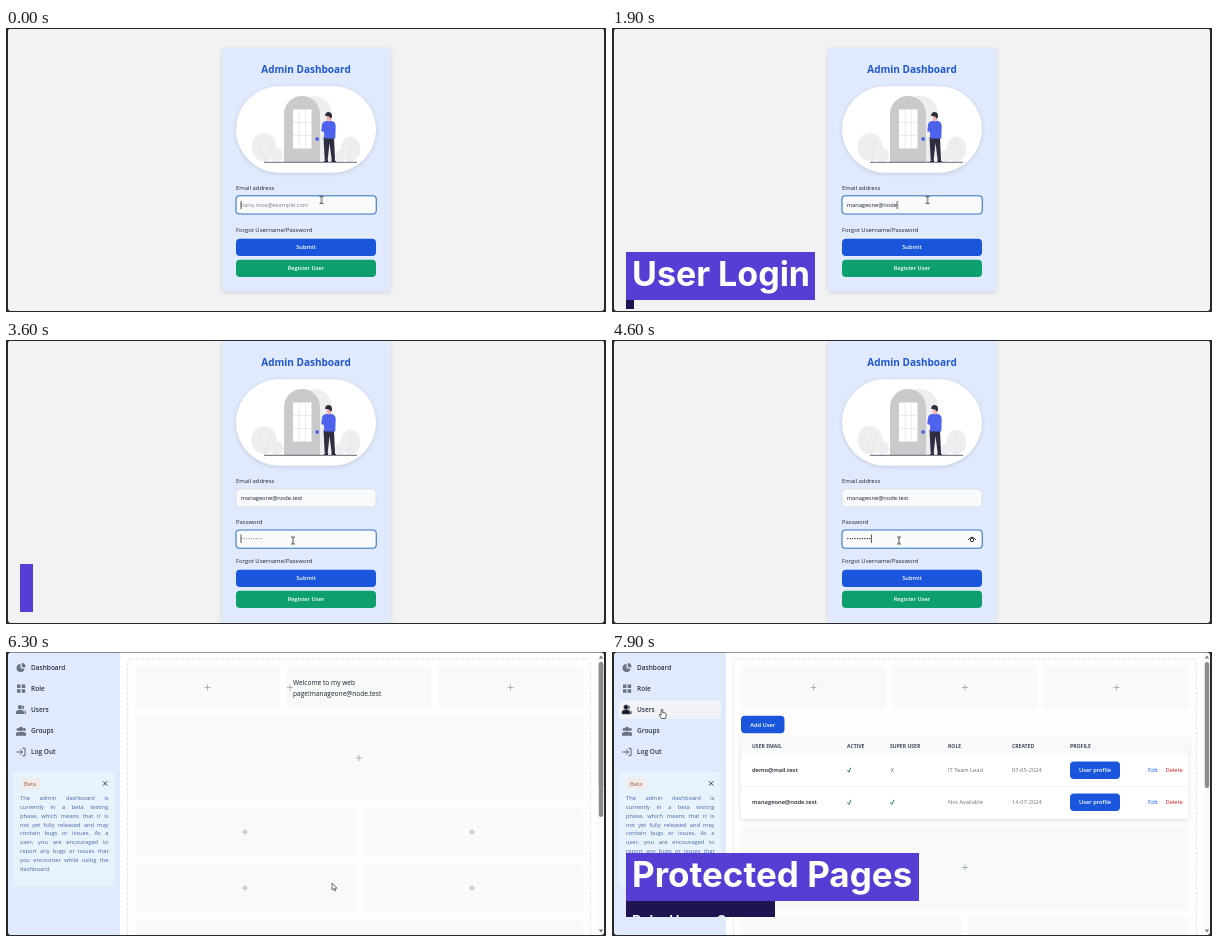
An HTML page for the animation above (8000 ms loop, 600 by 284 pixels).

```html
<!DOCTYPE html>
<html lang="en">
<head>
<meta charset="utf-8">
<title>Admin Dashboard</title>
<style>
html, body { margin: 0; width: 100%; height: 100%; overflow: hidden; background: #282929; }
#stage { position: relative; width: 600px; height: 284px; overflow: hidden; }
#stage > svg { position: absolute; left: 0; top: 0; }
text { font: 5.7px "Open Sans", "Noto Sans", sans-serif; fill: #1b2330; white-space: pre; }
.title { font-size: 10px; font-weight: 700; fill: #1f58d0; }
.label { font-size: 5.9px; font-weight: 500; }
.btn { font-size: 5.7px; font-weight: 600; fill: #fff; }
.mid { text-anchor: middle; }
.nav { font-size: 6.5px; font-weight: 600; fill: #2b3442; }
.head { font-size: 5.1px; font-weight: 700; fill: #414a58; }
.name { font-weight: 600; font-size: 5.8px; }
.soft { fill: #6b7280; }
.edit { fill: #1c64f2; font-weight: 500; }
.del { fill: #c81e1e; font-weight: 500; }
.welcome { font-size: 6.6px; }
.field { fill: #f9fafb; stroke: #d1d5db; stroke-width: .7; }
.focus { fill: none; stroke: #3f7fcf; stroke-width: 1.1; }
.blue { fill: #1a56db; }
.cell rect { fill: #f8f9f9; }
.shadow { filter: drop-shadow(0 1.5px 2px #0002); }
#beta { margin: 0; font: 5.75px/8.85px "Open Sans", "Noto Sans", sans-serif; color: #4a64a8; }
#beta span { display: block; text-align: justify; text-align-last: justify; }
#beta span:last-child { text-align-last: left; }

/* Scenes */
.login, .step1, .step2, .up, .down, .pass, .submit, .panel, .home, .role, .users, .tables,
.hoverR, .hoverU, .beam, .arrow, .hand { animation: 8s step-end infinite; }
.login { animation-name: login; }
.step1 { animation-name: step1; }
.step2 { animation-name: step2; }
.up { animation-name: up; }
.down { animation-name: down; }
.pass { animation-name: pass; }
.submit { animation-name: submit; }
.panel { animation-name: panel; }
.home { animation-name: home; }
.tables { animation-name: tables; }
.role { animation-name: role; }
.users { animation-name: users; }
.hoverR { animation-name: hoverR; }
.hoverU { animation-name: hoverU; }
.beam { animation-name: beam; }
.arrow { animation-name: arrow; }
.hand { animation-name: hand; }
@keyframes login { 0% { opacity: 1 } 72.5%, 100% { opacity: 0 } }
@keyframes step1 { 0% { opacity: 1 } 36.25%, 100% { opacity: 0 } }
@keyframes step2 { 0% { opacity: 0 } 36.25%, 100% { opacity: 1 } }
@keyframes up { 0% { transform: none } 36.25%, 100% { transform: translateY(-19px) } }
@keyframes down { 0% { transform: none } 36.25%, 100% { transform: translateY(19px) } }
@keyframes pass { 0% { opacity: 0 } 43.7% { opacity: 1 } 68.5%, 100% { opacity: 0 } }
@keyframes submit { 0% { opacity: 0 } 36.25% { opacity: 1 } 43.7% { opacity: 0 } 68.5%, 100% { opacity: 1 } }
@keyframes panel { 0% { opacity: 0 } 72.5%, 100% { opacity: 1 } }
@keyframes home { 0% { opacity: 0 } 72.5% { opacity: 1 } 87.5%, 100% { opacity: 0 } }
@keyframes tables { 0% { opacity: 0 } 87.5%, 100% { opacity: 1 } }
@keyframes role { 0% { opacity: 0 } 87.5% { opacity: 1 } 96.25%, 100% { opacity: 0 } }
@keyframes users { 0% { opacity: 0 } 96.25%, 100% { opacity: 1 } }
@keyframes hoverR { 0% { opacity: 0 } 86.3% { opacity: 1 } 94.5%, 100% { opacity: 0 } }
@keyframes hoverU { 0% { opacity: 0 } 94.5%, 100% { opacity: 1 } }
@keyframes beam { 0% { opacity: 1 } 34% { opacity: 0 } 43.2% { opacity: 1 } 66%, 100% { opacity: 0 } }
@keyframes arrow { 0% { opacity: 0 } 34% { opacity: 1 } 43.2% { opacity: 0 } 72.5% { opacity: 1 } 86.3%, 100% { opacity: 0 } }
@keyframes hand { 0% { opacity: 0 } 66% { opacity: 1 } 72.5% { opacity: 0 } 86.3%, 100% { opacity: 1 } }

.pointer { animation: point 8s ease-in-out infinite; }
@keyframes point {
  0%, 33.5% { transform: translate(315.5px, 172px) }
  38.7% { transform: translate(307.5px, 181px) }
  44%, 63.5% { transform: translate(287px, 200.5px) }
  68.5%, 72.5% { transform: translate(301px, 239px) }
  77%, 81.5% { transform: translate(326px, 231px) }
  87%, 92.5% { transform: translate(53px, 34.5px) }
  96.5%, 100% { transform: translate(50px, 57px) }
}

/* Captions */
.bar, .sub { position: absolute; left: 14px; overflow: hidden; color: #fff; white-space: pre;
  font-family: Inter, "Open Sans", sans-serif; }
.bar { height: 48px; background: #563dd3; font-size: 34px; font-weight: 700; line-height: 43px; }
.bar span, .sub span { display: block; margin-left: 6px; }
.sub { background: #1e1450; font-size: 14px; font-weight: 600; line-height: 28px; }
.bar, .bar span, .sub { animation: 8s cubic-bezier(.65, 0, .35, 1) infinite; }
.one { --w: 189px; top: 224px; }
.two { --w: 293px; top: 201px; font-size: 35px; }
.one.bar { animation-name: wide1; }
.one span { animation-name: slide1; }
.two.bar { animation-name: wide2; }
.two span { animation-name: slide2; }
@keyframes wide1 { 0% { width: 0 } 15%, 33.75% { width: var(--w) } 48.75%, 100% { width: 0 } }
@keyframes slide1 {
  0% { transform: translateX(calc(var(--w) / 2)) }
  15%, 33.75% { transform: none }
  48.75%, 100% { transform: translateX(calc(var(--w) / 2)) }
}
@keyframes wide2 { 0%, 81% { width: 0 } 96%, 100% { width: var(--w) } }
@keyframes slide2 { 0%, 81% { transform: translateX(calc(var(--w) / 2)) } 96%, 100% { transform: none } }
.dot { top: 272px; width: 8px; animation-name: dot; }
@keyframes dot { 0%, 12.5% { height: 0 } 22.5%, 25% { height: 9px } 33.5%, 100% { height: 0 } }
.list, .list span { animation: list 8s cubic-bezier(.65, 0, .65, .55) infinite; }
.list { top: 249px; width: 149px; }
.list span { animation-name: rise; }
@keyframes list { 0%, 93.5% { height: 0 } 100% { height: 23px } }
@keyframes rise { 0%, 93.5% { transform: translateY(14px) } 100% { transform: translateY(2.5px) } }
</style>
</head>
<body>
<div id="stage">
<svg width="600" height="284" viewBox="0 0 600 284">
  <defs>
    <path id="plus" d="M-3 0H3M0-3V3" stroke="#9ca3af" stroke-width=".8"/>
    <path id="person" d="M-4.5 4.5V3Q-4.5 .5-2 .5H1Q3.5 .5 3.5 3V4.5ZM-.5-4.5A2.2 2.2 0 1 1-.51-4.5Z"/>
    <clipPath id="frame"><rect x="2" y=".5" width="596" height="282.5" rx="3"/></clipPath>
  </defs>
  <g clip-path="url(#frame)">
  <g class="login">
    <rect width="600" height="284" fill="#f0f2f4"/>
    <rect class="step1 shadow" x="216" y="20" width="168.5" height="243.5" rx="3" fill="#e1eafd"/>
    <rect class="step2 shadow" x="216" y="1" width="168.5" height="282" rx="3" fill="#e1eafd"/>
    <g class="up">
      <text class="title mid" x="300" y="45.2">Admin Dashboard</text>
      <rect class="shadow" x="230" y="58.3" width="140" height="86.4" rx="43.2" fill="#fff"/>
      <g fill="#eeeeef">
        <ellipse cx="258" cy="119" rx="12.5" ry="14"/>
        <ellipse cx="270.5" cy="127" rx="6.5" ry="7"/>
        <ellipse cx="344.5" cy="121" rx="10" ry="12.5"/>
        <ellipse cx="334" cy="128" rx="5" ry="6"/>
        <path d="M290 134V86a18 18 0 0 1 36 0V134Z"/>
      </g>
      <path d="M252 112L260 134M264 113L260 134M344 112L341 134M350 118L342 130" stroke="#e0e0e2" stroke-width=".5" fill="none"/>
      <path d="M278 134V86a18 18 0 0 1 36 0V134Z" fill="#cacaca"/>
      <path d="M287 81.500H305.500V120.500H287Z" fill="#fff"/>
      <path d="M293.2 81.5V120.5M299.4 81.5V120.5M287 94.5H305.5M287 107.5H305.5" stroke="#e2e2e2" stroke-width=".7"/>
      <path d="M258 134.3H351" stroke="#3f3d56" stroke-width=".8"/>
      <path d="M317.500 109H328L329 132H325.700L323.500 115L321.700 132H318.700Z" fill="#2f2e41"/>
      <path d="M317.500 134Q318.500 131.500 322 132V134ZM325.500 134V132H328.500L330.500 134Z" fill="#24233a"/>
      <path d="M316 97Q316.500 93.500 320 93H325.500Q329.500 93.500 329.700 98L329.300 110.500H318.300L318 104L315.300 103Z" fill="#4d63ee"/>
      <rect x="309.6" y="109.2" width="3.2" height="3.6" rx="1" fill="#4761ea"/>
      <path d="M320.500 87.500H325V92.500Q323 94.500 321 92.500Z" fill="#f0b0b0"/>
      <path d="M319.2 88Q319 84 322.700 84Q326.500 84.500 326 89L324.800 91Q324 87.500 319.2 88Z" fill="#2f2e41"/>
      <text class="label" x="230" y="162">Email address</text>
      <rect class="field" x="230" y="168" width="140" height="18" rx="3.5"/>
      <rect class="focus step1" x="230" y="167.8" width="140.3" height="18.2" rx="3.5"/>
      <text id="mail" x="234.7" y="179"></text>
      <path id="mailCaret" class="step1" d="M0 173V181" stroke="#111" stroke-width=".7"/>
    </g>
    <g class="step2">
      <text class="label" x="230" y="184">Password</text>
      <rect class="field" x="230" y="190" width="140" height="18" rx="3.5"/>
      <text id="word" x="234.7" y="201" letter-spacing=".3"></text>
      <g class="pass">
        <rect class="focus" x="230" y="190" width="140.3" height="18.2" rx="3.5"/>
        <path id="wordCaret" d="M0 194.5V203" stroke="#111" stroke-width=".7"/>
        <g id="eye" fill="none" stroke="#222" stroke-width=".9">
          <path d="M356 200Q360 194.5 364 200"/><circle cx="360" cy="200" r="1.7"/>
        </g>
      </g>
    </g>
    <g class="down">
      <text class="label" x="230" y="204.2">Forgot Username/Password</text>
      <rect class="blue" x="230" y="210.7" width="140" height="17.4" rx="4"/>
      <rect class="submit" x="229.6" y="210.3" width="140.8" height="18.2" rx="4.5" fill="none" stroke="#0b1533" stroke-width="1.2"/>
      <text class="btn mid" x="300" y="221.4">Submit</text>
      <rect x="230" y="231.7" width="140" height="17.4" rx="4" fill="#0e9f6e"/>
      <text class="btn mid" x="300" y="242.4">Register User</text>
    </g>
  </g>

  <g class="panel">
    <rect width="600" height="284" fill="#fefefe"/>
    <rect width="114" height="284" fill="#e1eafd"/>
    <rect class="hoverR" x="7" y="28" width="102" height="17.5" rx="3" fill="#f1f3f6"/>
    <rect class="hoverU" x="7" y="49" width="102" height="17.5" rx="3" fill="#f1f3f6"/>
    <g fill="#6b7380">
      <path d="M14.5 12A4 4 0 1 0 18.5 16.5H14.5ZM15.8 11V15.2H19.5A4 4 0 0 0 15.8 11Z"/>
      <path id="grid" d="M11 32.5h3.5v3.5h-3.5zM15.7 32.5h3.5v3.5h-3.5zM11 37.2h3.5v3.5h-3.5zM15.7 37.2h3.5v3.5h-3.5z"/>
      <g id="pair">
        <use href="#person" x="14.5" y="57.5"/>
        <path d="M16.5 53.2a2.2 2.2 0 0 1 0 4.3zM18.6 58.2Q20 58.5 20 62H18.6Z"/>
      </g>
      <use href="#person" x="15.5" y="79.3"/>
      <path d="M12 76a1.5 1.5 0 1 0 .1 0zM18.3 76a1.5 1.5 0 1 0 .1 0zM10 83.8V81.5Q10 80 11.500 80V83.8ZM18.5 80Q20 80 20 81.5V83.8H18.5Z"/>
      <path d="M10.5 100H16.5M14 97.5L16.5 100L14 102.5M16.5 96.3H19V103.7H16.5" fill="none" stroke="#4b5563" stroke-width=".9"/>
    </g>
    <g fill="#111827">
      <use class="hoverR" href="#grid"/>
      <use class="hoverU" href="#person" x="14.5" y="57.5"/>
    </g>
    <text class="nav" x="25" y="18">Dashboard</text>
    <text class="nav" x="25" y="39">Role</text>
    <text class="nav" x="25" y="60">Users</text>
    <text class="nav" x="25" y="81.3">Groups</text>
    <text class="nav" x="25" y="102.3">Log Out</text>
    <rect x="7" y="120" width="101.5" height="114" rx="3" fill="#e6f3fc"/>
    <rect x="15" y="126" width="19.5" height="11" rx="2" fill="#f3ebe9"/>
    <text x="18" y="133.7" style="fill:#96584a;font-weight:500">Beta</text>
    <path d="M97 129.3L101.3 133.6M101.3 129.3L97 133.6" stroke="#1f2937" stroke-width=".9"/>
    <foreignObject x="14" y="142" width="88.5" height="85"><p id="beta"><span>The admin dashboard is</span><span>currently in a beta testing</span><span>phase, which means that it is</span><span>not yet fully released and may</span><span>contain bugs or issues. As a</span><span>user, you are encouraged to</span><span>report any bugs or issues that</span><span>you encounter while using the</span><span>dashboard.</span></p></foreignObject>

    <rect x="121.5" y="7" width="463" height="300" rx="4" fill="none" stroke="#e2e4e8" stroke-dasharray="3 2"/>
    <g class="cell">
      <rect x="129" y="14" width="145" height="43" rx="2"/>
      <rect x="280.5" y="14" width="145" height="43" rx="2"/>
      <rect x="432" y="14" width="145" height="43" rx="2"/>
    </g>
    <use href="#plus" x="201.5" y="35.5"/>
    <use href="#plus" x="504.5" y="35.5"/>

    <g class="home">
      <use href="#plus" x="284" y="35.5"/>
      <text class="welcome" x="287" y="33.2">Welcome to my web</text>
      <text class="welcome" x="287" y="43.6">page!manageone@node.test</text>
      <g class="cell">
        <rect x="129" y="64" width="448" height="85" rx="2"/>
        <rect x="129" y="156" width="221" height="49" rx="2"/>
        <rect x="357" y="156" width="220" height="49" rx="2"/>
        <rect x="129" y="212" width="221" height="49" rx="2"/>
        <rect x="357" y="212" width="220" height="49" rx="2"/>
        <rect x="129" y="268" width="448" height="30" rx="2"/>
      </g>
      <use href="#plus" x="353" y="106"/>
      <use href="#plus" x="239" y="180"/><use href="#plus" x="466" y="180"/>
      <use href="#plus" x="239" y="236"/><use href="#plus" x="466" y="236"/>
    </g>

    <g class="tables">
      <use href="#plus" x="353" y="35.5"/>
      <rect class="blue" x="129" y="63.8" width="43.5" height="17.4" rx="4"/>
    </g>
    <g class="role">
      <text class="btn mid" x="150.7" y="74.6">Add Role</text>
      <rect class="shadow" x="129" y="85" width="447.5" height="87" rx="2" fill="#fff"/>
      <rect x="129" y="85" width="447.5" height="18" fill="#f8f9fb"/>
      <path d="M129 126H576M129 149H576" stroke="#eceef1" stroke-width=".7"/>
      <text class="head" x="140" y="95.8">ROLE NAME</text>
      <text class="head" x="228" y="95.8">ROLE DESCRIPTION</text>
      <g id="roles"></g>
      <g class="cell">
        <rect x="129" y="179" width="448" height="85" rx="2"/>
        <rect x="129" y="271" width="221" height="30" rx="2"/>
        <rect x="357" y="271" width="220" height="30" rx="2"/>
      </g>
      <use href="#plus" x="353" y="221.5"/>
    </g>
    <g class="users">
      <text class="btn mid" x="150.7" y="74.6">Add User</text>
      <rect class="shadow" x="129" y="85" width="447.5" height="82" rx="2" fill="#fff"/>
      <rect x="129" y="85" width="447.5" height="18" fill="#f8f9fb"/>
      <path d="M129 134.5H576" stroke="#eceef1" stroke-width=".7"/>
      <g id="accounts"></g>
      <g class="cell">
        <rect x="129" y="174" width="448" height="84" rx="2"/>
        <rect x="129" y="265" width="221" height="30" rx="2"/>
        <rect x="357" y="265" width="220" height="30" rx="2"/>
      </g>
      <use href="#plus" x="353" y="215.5"/>
    </g>
    <rect x="591" width="8" height="284" fill="#fafafa"/>
    <path d="M592.8 6.5L595 3.5L597.2 6.5ZM592.8 277.5L595 280.5L597.2 277.5Z" fill="#777"/>
    <rect x="592.8" y="10" width="4.4" height="126" rx="2.2" fill="#8b8b8b"/>
    <rect class="home" x="592.8" y="10" width="4.4" height="155" rx="2.2" fill="#8b8b8b"/>
  </g>

  <g class="pointer">
    <path class="beam" d="M-2-3.7Q0-3.7 0-2.7Q0-3.7 2-3.7M0-3V3M-2 3.7Q0 3.7 0 2.7Q0 3.7 2 3.7" fill="none" stroke="#222" stroke-width=".8"/>
    <path class="arrow" d="M0 0V7L1.6 5.6L2.7 8L3.8 7.5L2.8 5.2H5Z" fill="#fff" stroke="#333" stroke-width=".7"/>
    <path class="hand" d="M-.8 .7Q0-.6 .8 .7V3.5L3.5 4.1Q4.5 4.5 4.3 6L3.5 9.5H-.6L-3 6Q-2.6 4.8-.8 6Z" fill="#fff" stroke="#222" stroke-width=".7"/>
  </g>
  </g>
</svg>
<div class="bar one"><span>User Login</span></div>
<div class="sub dot"></div>
<div class="bar two"><span>Protected Pages</span></div>
<div class="sub list"><span>Role, Users, Groups</span></div>
</div>
<script>
const start = performance.now();
const $ = id => document.getElementById(id);
const label = (x, y, text, cls = "") => `<text class="${cls}" x="${x}" y="${y}">${text}</text>`;
const actions = (x, y, gap) => label(x, y, "Edit", "edit") + label(x + gap, y, "Delete", "del");

$("roles").innerHTML = [
  ["Supervisor", "Supervisor Role is to overview the team and projects - Refresh"],
  ["Manager", "Role to manage the team participants"],
  ["IT Team Lead", "Manages all aspects of the IT team"]
].map(([name, about], i) => {
  const y = 116 + i * 23.2;
  return label(140, y, name, "name") + label(228, y, about, "soft") + actions(526, y, 27);
}).join("");

const cols = [140, 235, 278, 336, 400, 458];
const mark = (x, y, on) => on
  ? `<path d="M${x + .5} ${y - 2}l1.3 2l2.2-4.5" fill="none" stroke="#046c4e" stroke-width=".9"/>`
  : `<path d="M${x + .8} ${y - 4.2}l3 4.4m0-4.4l-3 4.4" stroke="#6b7280" stroke-width=".6"/>`;
$("accounts").innerHTML =
  ["USER EMAIL", "ACTIVE", "SUPER USER", "ROLE", "CREATED", "PROFILE"]
    .map((h, i) => label(cols[i], 95.8, h, "head")).join("") +
  [
    ["demo@mail.test", false, "IT Team Lead", "07-05-2024"],
    ["manageone@node.test", true, "Not Available", "14-07-2024"]
  ].map(([mail, top, role, date], i) => {
    const y = 120.2 + i * 32.2;
    return label(cols[0], y, mail, "name") + mark(cols[1], y, true) + mark(cols[2], y, top) +
      label(cols[3], y, role, "soft") + label(cols[4], y, date, "soft") +
      `<rect class="blue" x="458" y="${y - 10.8}" width="50" height="17.5" rx="4"/>` +
      label(483, y, "User profile", "btn mid") + actions(536, y, 17.5);
  }).join("");

const address = "manageone@node.test";
const [mail, word] = [$("mail"), $("word")];
const clamp = (n, max) => Math.max(0, Math.min(max, Math.floor(n)));

function show(el, text, color) {
  if (el.textContent !== text) el.textContent = text;
  el.style.fill = color;
}
function setCaret(el, field, typed) {
  const x = 235 + (typed ? field.getComputedTextLength() : 0);
  el.setAttribute("transform", `translate(${x} 0)`);
}

function draw(now) {
  const t = Math.max(0, now - start) % 8000;
  const typed = clamp((t - 300) / 112, address.length);
  show(mail, typed ? address.slice(0, typed) : "hana.moe@example.com", typed ? "#1b2330" : "#7a818d");
  setCaret($("mailCaret"), mail, typed);

  const dots = clamp((t - 3600) / 78, 9) + (t >= 4600) + (t >= 4800);
  show(word, "•".repeat(dots || 9), dots ? "#111827" : "#8b929e");
  setCaret($("wordCaret"), word, dots);
  $("eye").style.opacity = dots ? 1 : 0;
  requestAnimationFrame(draw);
}
draw(start);
</script>
</body>
</html>
```
